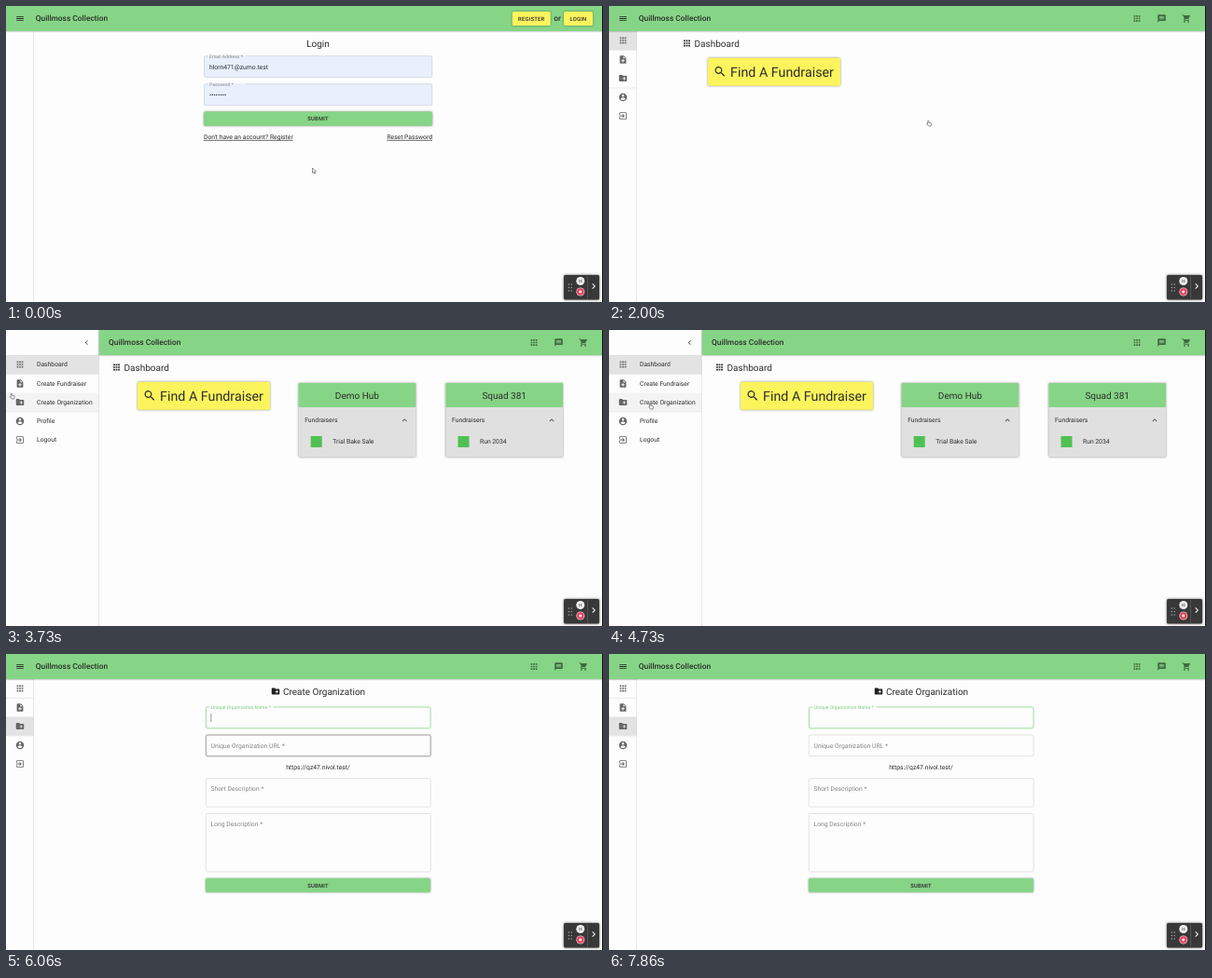
Write an HTML page that moves like this. It is 640 px wide and 318 px high and loops after 8 s.

```html
<!DOCTYPE html>
<html lang="en">
<head>
<meta charset="utf-8">
<title>Dashboard walkthrough</title>
<style>
html, body { margin: 0; width: 100%; height: 100%; overflow: hidden; background: #fdfdfd; }
svg { display: block; }
#stage { font-family: Roboto, sans-serif; fill: #2c2c2c; text-rendering: geometricPrecision; }
.raised { filter: drop-shadow(0 .8px .9px rgba(0, 0, 0, .45)); }
.floating { filter: drop-shadow(0 .6px 1.6px rgba(0, 0, 0, .6)); }
</style>
</head>
<body>
<svg id="stage" width="640" height="318" viewBox="0 0 640 318"></svg>
<script>
const GREEN = '#86d586', YELLOW = '#fcf45c', GREY = '#858585', LINE = '#d2d2d2', INK = '#212121';
const LOOP = 8000, BASE = 6.78;

// Icons on a 24-unit grid
const ICONS = {
  apps: [4, 10, 16].flatMap(x => [4, 10, 16].map(y => `M${x} ${y}h4v4h-4z`)).join(''),
  menu: 'M3 6h18v2H3zM3 11h18v2H3zM3 16h18v2H3z',
  file: 'M14 2H6q-2 0-2 2v16q0 2 2 2h12q2 0 2-2V8zm2 14h-3v3h-2v-3H8v-2h3v-3h2v3h3zm-3-7V3.5L18.5 9z',
  folder: 'M20 6h-8l-2-2H4q-2 0-2 2v12q0 2 2 2h16q2 0 2-2V8q0-2-2-2zm-1 8h-3v3h-2v-3h-3v-2h3V9h2v3h3z',
  person: 'M12 2a10 10 0 1 0 0 20a10 10 0 1 0 0-20zm0 3a3 3 0 1 1 0 6a3 3 0 1 1 0-6zm0 14.2c-2.5 0-4.7-1.3-6-3.2c0-2 4-3.1 6-3.1s6 1.1 6 3.1c-1.3 1.9-3.5 3.2-6 3.2z',
  exit: 'M10.1 15.6L11.5 17l5-5-5-5-1.4 1.4L12.7 11H3v2h9.7zM19 3H5q-2 0-2 2v4h2V5h14v14H5v-4H3v4q0 2 2 2h14q2 0 2-2V5q0-2-2-2z',
  chat: 'M20 2H4q-2 0-2 2v18l4-4h14q2 0 2-2V4q0-2-2-2zm-2 12H6v-2h12zm0-3H6V9h12zm0-3H6V6h12z',
  cart: 'M7 18a2 2 0 1 0 0 4a2 2 0 1 0 0-4zM17 18a2 2 0 1 0 0 4a2 2 0 1 0 0-4zM1 2v2h2l3.6 7.6-1.4 2.4c-.7 1.3.3 3 1.8 3h12v-2H7.4l1-2h7.2q1.2 0 1.7-1L21 5.5Q21.3 4 20 4H5.2l-.9-2z',
  search: 'M15.5 14h-.8l-.3-.3A6.5 6.5 0 1 0 13.7 14.4l.3.3v.8l5 5 1.5-1.5zm-6 0a4.5 4.5 0 1 1 0-9a4.5 4.5 0 1 1 0 9z',
  up: 'M12 8l-6 6 1.4 1.4L12 10.8l4.6 4.6L18 14z',
  left: 'M15.4 7.4L14 6l-6 6 6 6 1.4-1.4L10.8 12z',
  right: 'M8.6 16.6L13.2 12 8.6 7.4 10 6l6 6-6 6z'
};

// Text and icons are placed by their vertical centre
const icon = (name, x, y, fill = '#666', size = 10.2) =>
  `<path d="${ICONS[name]}" fill="${fill}" fill-rule="evenodd" transform="translate(${x - size / 2} ${y - size / 2}) scale(${size / 24})"/>`;
const text = (s, x, y, size = BASE, attrs = '') =>
  `<text x="${x}" y="${y + size * .355}" font-size="${size}" ${attrs}>${s}</text>`;
const middle = (s, x, y, size, attrs = '') => text(s, x, y, size, 'text-anchor="middle" ' + attrs);
const rect = (x, y, w, h, fill, attrs = '') =>
  `<rect x="${x}" y="${y}" width="${w}" height="${h}" fill="${fill}" ${attrs}/>`;
const dot = (x, y, r, fill) => `<circle cx="${x}" cy="${y}" r="${r}" fill="${fill}"/>`;
const button = (s, x, y, w, h, fill, id = '') =>
  rect(x, y, w, h, fill, `class="raised" rx="1.5" id="${id}"`) +
  middle(s, x + w / 2, y + h / 2, 5.9, 'font-weight="500" letter-spacing=".17"');
const field = (y, h, label, labelY, id = '') =>
  rect(214.3, y, 240.9, h, 'none', `id="${id}" stroke="${LINE}" stroke-width=".6" rx="1.7"`) +
  text(label, 219.5, labelY, BASE, `fill="${GREY}"`);
const filled = (y, label, value) =>
  rect(212.4, y, 244.4, 23, '#e8f0fe', 'stroke="#c3c8d0" stroke-width=".6" rx="1.7"') +
  rect(216.5, y - .6, 40, 1.2, '#f1f5fd') +
  text(label, 218, y + .2, 5.08, `fill="${GREY}"`) + text(value, 218, y + 11.7);

const card = (x, org, event) => `<g class="raised">${rect(x, 57, 125.5, 79.5, '#e0e0e0', 'rx="1.5"')}
  ${rect(x, 57, 125.5, 26, GREEN, 'rx="1"')}</g>` +
  middle(org, x + 62.7, 70, 10) + text('Fundraisers', x + 6.5, 97) + icon('up', x + 113.5, 97, '#555') +
  rect(x + 13, 114, 12, 12, '#4fc153') + text(event, x + 36.5, 120);

const rows = [['apps', 'Dashboard', 37], ['file', 'Create Fundraiser', 57.5],
  ['folder', 'Create Organization', 77.5], ['person', 'Profile', 98], ['exit', 'Logout', 118]];
const rule = y => rect(0, y, 100, .5, '#dcdcdc');

const login = middle('Login', 334.5, 40, 10) +
  filled(53.7, 'Email Address *', 'hlorn471@zumo.test') + filled(83.7, 'Password *', '••••••••') +
  button('SUBMIT', 212, 113.5, 245, 15.3, GREEN, 'loginButton') +
  '<svg x="212" y="113.5" width="245" height="15.3"><circle id="ripple" cx="131" cy="10" fill="#000"/></svg>' +
  text("Don't have an account? Register", 212, 140.5, BASE, 'text-decoration="underline"') +
  text('Reset Password', 457, 140.5, BASE, 'text-anchor="end" text-decoration="underline"');

const dashboard = icon('apps', 83.5, 40, INK) + text('Dashboard', 91.5, 40, 10) +
  rect(106, 55.7, 142, 30, YELLOW, 'class="raised" rx="1.5"') +
  icon('search', 119, 70.5, INK, 14.5) + text('Find A Fundraiser', 130, 70.5, 14.3) +
  `<g id="cards">${card(278.7, 'Demo Hub', 'Trial Bake Sale')}${card(436.5, 'Squad 381', 'Run 2034')}</g>`;

const form = icon('folder', 289, 40, INK) + text('Create Organization', 297, 40, 10) +
  rect(214.4, 57, 240.7, 22.8, 'none', `stroke="${GREEN}" stroke-width=".8" rx="1.7"`) +
  rect(218, 56, 68.5, 2, '#fdfdfd') +
  text('Unique Organization Name *', 219.7, 57, 5.08, 'fill="#7fcb7f"') +
  rect(219.6, 64, .6, 9, '#555', 'id="caret"') +
  field(87, 22.8, 'Unique Organization URL *', 98.5, 'urlField') +
  middle('https://qz47.nivol.test/', 334.5, 122, BASE) +
  field(133.7, 30.5, 'Short Description *', 145) + field(171.5, 62.5, 'Long Description *', 183) +
  button('SUBMIT', 214, 241, 241, 15, GREEN);

const recorder = rect(598, 289, 38, 26.5, '#383838', 'class="floating" rx="1.5"') +
  [603.3, 606.2].map(x => [299, 302.5, 306].map(y => dot(x, y, .7, '#aaa')).join('')).join('') +
  dot(615.8, 295.5, 4.5, '#eee') + rect(614.4, 293.9, .8, 3.2, '#555') + rect(616.4, 293.9, .8, 3.2, '#555') +
  dot(615.8, 307, 4.5, '#eec4ca') + dot(615.8, 307, 3.7, '#e0405a') + rect(614.5, 305.7, 2.6, 2.6, '#fff') +
  rect(623, 290, .6, 25, '#666') + icon('right', 630, 301, '#fff', 12);

document.getElementById('stage').innerHTML = `
${rect(0, 0, 640, 318, '#fdfdfd')}
<g id="content">
  <g id="login">${login}</g>
  <g id="dashboard">${dashboard}</g>
  <g id="form">${form}</g>
</g>
<circle id="spinner" cx="321" cy="171" r="12" fill="none" stroke="${YELLOW}" stroke-width="2.2" stroke-dasharray="50 26"/>
<svg id="drawer" height="318">
  ${rect(0, 0, 110, 318, '#fdfdfd')}
  <g id="items">
    ${rows.map(([, , y], i) => rect(0, y - 10, 110, 20.2, 'none', `id="row${i}"`)).join('')}
    ${rule(27)}${rule(47.3)}${rule(87.7)}
    ${rows.map(([name, label, y]) => icon(name, 15, y) + text(label, 33, y)).join('')}
    <g id="chevron">${icon('left', 0, 13.5, '#555')}</g>
  </g>
</svg>
${rect(0, 0, .6, 318, '#dadada', 'id="edge"')}
${rect(0, 0, 640, 27, GREEN, 'id="bar" class="raised"')}
<g id="menu">${icon('menu', 15, 13.5, INK)}</g>
<g id="brand">${text('Quillmoss Collection', 0, 13.5, 8.4, 'font-weight="500"')}</g>
<g id="guest">${button('REGISTER', 542.7, 6, 41, 15, YELLOW)}${middle('or', 591, 13.5, 8.4, 'font-weight="500"')}${button('LOGIN', 598, 6, 31, 15, YELLOW)}</g>
<g id="member">${icon('apps', 566, 13.5, '#3f6a3f')}${icon('chat', 592.5, 13.5, '#3f6a3f')}${icon('cart', 619, 13.5, '#3f6a3f')}</g>
${rect(639, 0, 1, 318, '#111')}
${recorder}
<g id="cursor" stroke="#444" stroke-width=".6" fill="#fff" stroke-linejoin="round">
  <path id="arrow" d="M-1.5-3v5.3l1.3-1.1 1 2 .9-.4-.9-2h1.5z"/>
  <path id="hand" d="M-1.3 0v-2.5q.6-.9 1.1 0v1.7l2.3.5q.5.2.4.9l-.4 2.4h-2.500l-1.9-2.2q.2-.8 1-.2z"/>
</g>`;

const $ = id => document.getElementById(id);
const set = (id, name, value) => $(id).setAttribute(name, value);
const show = (id, on) => set(id, 'display', on ? 'inline' : 'none');
const move = (id, x, y = 0) => set(id, 'transform', `translate(${x} ${y})`);
const ramp = (t, from, to) => Math.min(1, Math.max(0, (t - from) / (to - from)));
const ease = u => u * u * (3 - 2 * u);

// time, x, y of the pointer
const pointerPath = [[60, 330, 177], [600, 343, 126], [2790, 343, 126], [3130, 190, 109], [3340, 15, 14],
  [3430, 15, 14], [3720, 6.5, 71], [4400, 45, 82], [5080, 45, 82], [5290, 86, 14], [5400, 86, 14], [5860, 333, 98]];

function pointerAt(t) {
  let i = pointerPath.findIndex(k => k[0] > t);
  if (i < 0) i = pointerPath.length - 1;
  const b = pointerPath[i], a = pointerPath[Math.max(0, i - 1)];
  const u = ease(ramp(t, a[0], b[0]));
  return [a[1] + (b[1] - a[1]) * u, a[2] + (b[2] - a[2]) * u];
}

function draw(t) {
  const loggedIn = t >= 1600, onForm = t >= 4800;
  const open = ease(ramp(t, 3400, 3625)) - ease(ramp(t, 5330, 5525));
  const expanded = t >= 3400 && t < 5330;
  const width = 30 + 70 * open;
  const [x, y] = pointerAt(t);

  show('login', !loggedIn);
  show('guest', !loggedIn);
  show('member', loggedIn);
  show('items', loggedIn);
  show('spinner', loggedIn && t < 1930);
  set('spinner', 'transform', `rotate(${t * .3} 321 171)`);
  show('dashboard', t >= 1930 && !onForm);
  show('cards', t >= 2200);
  show('form', onForm);

  // Login button hover and press
  const hover = ramp(t, 480, 660);
  set('loginButton', 'fill', `rgb(${134 - 34 * hover}, ${213 - 55 * hover}, ${134 - 34 * hover})`);
  const press = ramp(t, 1330, 1600);
  set('ripple', 'r', 135 * press);
  set('ripple', 'opacity', .14 * (1 - press * .6));

  // Sliding drawer
  move('content', 35 * open);
  set('drawer', 'width', width);
  set('edge', 'x', width - .7);
  set('bar', 'x', 100 * open);
  move('chevron', width - 13.7);
  show('menu', !expanded);
  move('menu', 100 * open);
  move('brand', 100 * open + (expanded ? 10 : 31.7));
  rows.forEach(([, , rowY], i) => {
    const over = t > 2800 && x < width && Math.abs(y - rowY) < 10;
    const selected = i === (onForm ? 2 : 0);
    set('row' + i, 'fill', selected ? (over ? '#d9d9d9' : '#e3e3e3') : over ? '#f3f3f3' : 'none');
  });

  show('caret', Math.floor((t - 4810) / 530) % 2 === 0);
  set('urlField', 'stroke', t >= 6000 && t < 6300 ? '#555' : LINE);

  const link = (t > 480 && t < 2800) || (t > 3300 && t < 5560 && (x < width || y < 24));
  show('cursor', t < 5800);
  move('cursor', x, y);
  show('hand', link);
  show('arrow', !link);
}

function tick() {
  draw(performance.now() % LOOP);
  requestAnimationFrame(tick);
}
tick();
</script>
</body>
</html>
```
